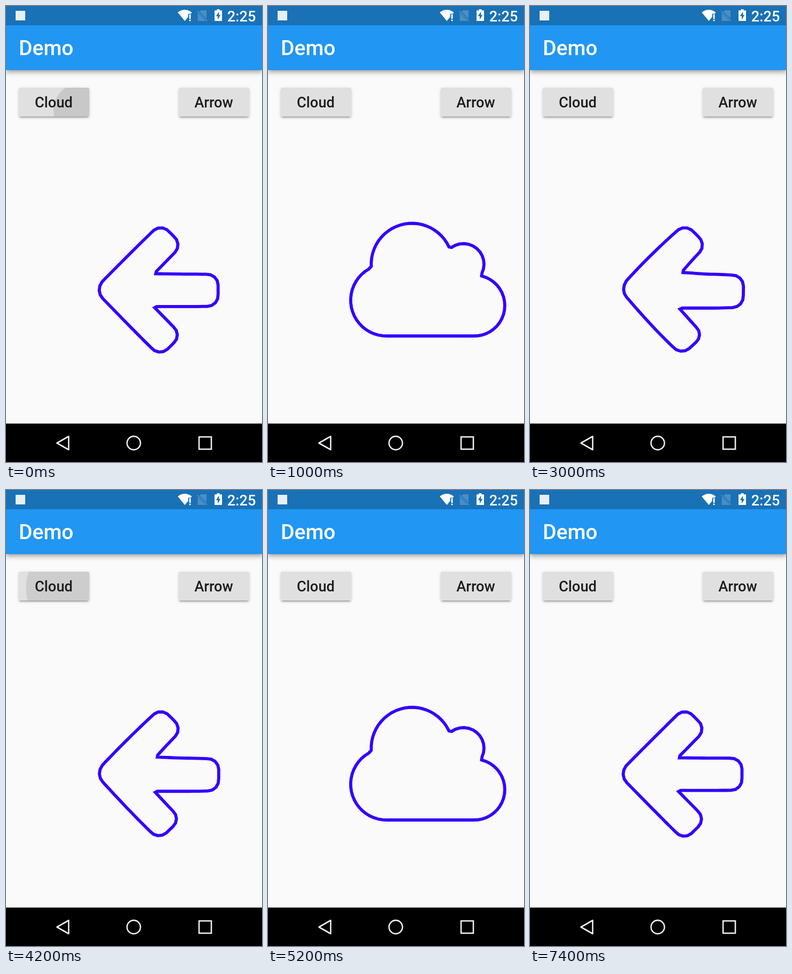
Animation of 480 by 854 pixels, one loop 7.5 s. Source, as an HTML page:

```html
<!DOCTYPE html>
<html lang="en">
<head>
<meta charset="utf-8">
<title>Path morph demo</title>
<style>
  html, body { margin: 0; width: 100%; height: 100%; overflow: hidden; background: #fafafa; }
  #stage { position: absolute; left: 0; top: 0; width: 480px; height: 854px; overflow: hidden; background: #fafafa; }
  #stage > * { position: absolute; }
  .bar { left: 0; top: 0; width: 480px; height: 120px; background: #2196f3;
    box-shadow: 0 3px 6px -1.5px rgba(0,0,0,.2), 0 6px 7.5px rgba(0,0,0,.14), 0 1.5px 15px rgba(0,0,0,.12); }
  .button { top: 153px; width: 132px; height: 54px; border-radius: 3px; background: #e0e0e0;
    box-shadow: 0 4.5px 1.5px -3px rgba(0,0,0,.2), 0 3px 3px rgba(0,0,0,.14), 0 1.5px 7.5px rgba(0,0,0,.12); }
  svg { left: 0; top: 0; display: block; }
  text { font-family: Roboto, sans-serif; font-weight: 500; }
</style>
</head>
<body>
<div id="stage">
  <div class="bar"></div>
  <div class="button" style="left:24px"></div>
  <div class="button" style="left:324px"></div>
  <svg width="480" height="854" viewBox="0 0 480 854">
    <clipPath id="buttons">
      <rect x="24" y="153" width="132" height="54" rx="3"/>
      <rect x="324" y="153" width="132" height="54" rx="3"/>
    </clipPath>

    <!-- status bar -->
    <rect width="480" height="36" fill="#1971b6"/>
    <rect x="18" y="9" width="18" height="18" fill="#e8eff6"/>
    <path d="M322 12Q335 2 348.5 12L346.5 14.5H341.5V20.5L335.3 28Z" fill="#fff"/>
    <path d="M343.6 15.5h2.8v8.5h-2.8zM343.6 25.5h2.8v2.8h-2.8z" fill="#fff"/>
    <path d="M366 8H376V23.5L362.5 10.5ZM359.5 13L374.5 28H359.5Z" fill="#4a8ec5"/>
    <path d="M358.5 9.5L377 28" stroke="#4a8ec5" stroke-width="1.8"/>
    <path d="M395.5 6h5v2.2h4.5V28h-14V8.200h4.500z" fill="#fff"/>
    <path d="M399.300 10.500L393.800 19H397V25.500L402.300 16.800H399.300Z" fill="#1971b6"/>
    <text x="468.500" y="29" font-size="27.300" text-anchor="end" fill="#fff">2:25</text>

    <text x="24" y="91.500" font-size="39" fill="#fff">Demo</text>

    <g clip-path="url(#buttons)"><circle id="ripple"/></g>
    <g font-size="27.300" text-anchor="middle" fill="#1d1d1d">
      <text x="89.500" y="189.500">Cloud</text>
      <text x="389.500" y="189.500">Arrow</text>
    </g>

    <path id="shape" fill="none" stroke="#3300ff" stroke-width="5.800"/>

    <!-- navigation bar -->
    <rect y="782" width="480" height="72" fill="#000"/>
    <g fill="none" stroke="#eee" stroke-width="2.600">
      <path d="M95.500 818.500L117.500 806V831Z" stroke-linejoin="round"/>
      <circle cx="239.500" cy="818.500" r="12.600"/>
      <rect x="362" y="807" width="23" height="23"/>
    </g>
  </svg>
</div>
<script>
const LOOP = 7500, STEP = 100, MORPH = 1000, SAMPLES = 100;
const shape = document.getElementById('shape');
const ripple = document.getElementById('ripple');

// Clockwise arcs, angles in degrees: cx, cy, r, from, to
const cloudArcs = [
  [387, 561, 57, 0, 90],
  [222, 551, 67, 90, 245.2],
  [270, 483.5, 76.5, 175.1, 338],
  [366.5, 483.5, 38.5, 228.3, 394.3],
  [387, 561, 57, 281.4, 360]
];

function polar(cx, cy, r, deg) {
  const a = deg * Math.PI / 180;
  return (cx + r * Math.cos(a)).toFixed(2) + ' ' + (cy + r * Math.sin(a)).toFixed(2);
}

const cloudPath = cloudArcs.map(([cx, cy, r, from, to], i) =>
  `${i ? 'L' : 'M'}${polar(cx, cy, r, from)}A${r} ${r} 0 0 1 ${polar(cx, cy, r, to)}`
).join('') + 'Z';

const bend = 'A20 20 0 0 1 ';
const arrowPath = `M397 522V542${bend}377 562H276L316.4 602.4${bend}316.4 630.6
  L304.1 642.9${bend}275.9 642.9L181.3 548.3A23 23 0 0 1 181.3 515.7
  L275.9 421.1${bend}304.1 421.1L316.4 433.4${bend}316.4 461.6L276 502H377${bend}397 522Z`;

// Points spaced evenly along the outline
function sample(d) {
  const path = document.createElementNS('http://www.w3.org/2000/svg', 'path');
  path.setAttribute('d', d);
  const length = path.getTotalLength();
  return Array.from({ length: SAMPLES }, (_, i) => path.getPointAtLength(length * i / SAMPLES));
}

const cloud = sample(cloudPath), arrow = sample(arrowPath);

// Start time and the outline each tap leads to (0 cloud, 1 arrow)
const morphs = [[-15, 0], [2067, 1], [4160, 0], [6410, 1]];

// start, end, cx, cy, r, colour
const ripples = [
  [0, 100, 139, 195, 50, '#c8c8c8'],
  [100, 200, 120, 185, 110, '#d4d4d4'],
  [2100, 2200, 390, 180, 100, '#cfcdcd'],
  [4200, 4300, 137.5, 184, 100, '#cdcdcd'],
  [6500, 6600, 390, 180, 100, '#cfcdcd']
];

function arrowShare(ms) {
  const [start, goal] = morphs.filter(m => m[0] <= ms).pop();
  const p = Math.min(1, (ms - start) / MORPH);
  return goal ? p : 1 - p;
}

function draw(ms) {
  const t = arrowShare(ms);
  const mix = (a, b) => (a + (b - a) * t).toFixed(2);
  shape.setAttribute('d', 'M' + cloud.map((c, i) =>
    mix(c.x, arrow[i].x) + ' ' + mix(c.y, arrow[i].y)).join('L') + 'Z');

  const hit = ripples.find(r => ms >= r[0] && ms < r[1]);
  ripple.setAttribute('visibility', hit ? 'visible' : 'hidden');
  if (hit) ['cx', 'cy', 'r', 'fill'].forEach((name, i) => ripple.setAttribute(name, hit[i + 2]));
}

const began = performance.now();
function tick() {
  const ms = (performance.now() - began) % LOOP;
  draw(Math.floor(ms / STEP) * STEP);
  requestAnimationFrame(tick);
}
tick();
</script>
</body>
</html>
```
